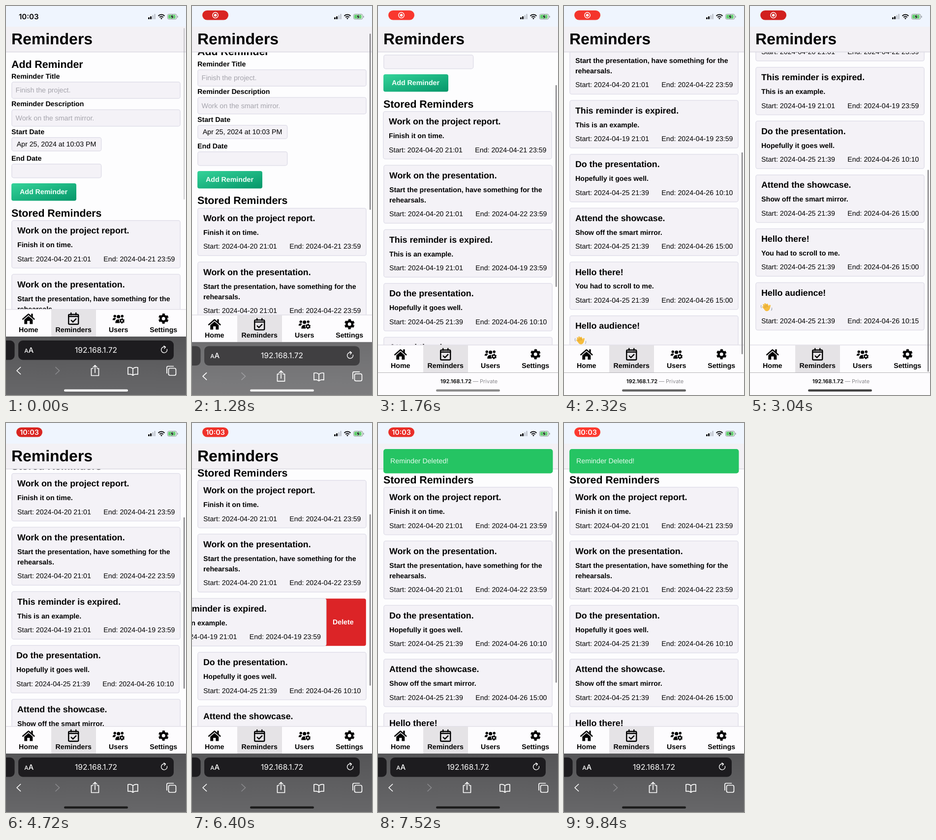
An HTML page that plays this animation: 366x792 px, repeating every 9.92 s.

```html
<!DOCTYPE html>
<html lang="en">
<head>
<meta charset="utf-8">
<title>Reminders</title>
<style>
  html, body { margin: 0; width: 100%; height: 100%; overflow: hidden; background: #fdfdfe; }
  svg { display: block; width: 366px; height: 792px; font: 14.2px "Liberation Sans", Arial, sans-serif; text-rendering: geometricPrecision; }
  .b { font-weight: 700; }
  .ui { font-family: Inter, sans-serif; }
  .box { fill: #f4f2f7; stroke: #e1e0ea; stroke-width: 1.5; }
  .line { fill: none; stroke: #fff; stroke-width: 1.7; stroke-linecap: round; stroke-linejoin: round; }
</style>
</head>
<body>
<svg id="stage" viewBox="0 0 366 792"></svg>
<script>
const LOOP = 9920, STEP = 80, CARD_H = 98.2, LINE_H = 21.3, GAP = 11.4, EXPIRED = 2;

const cards = [
  { title: 'Work on the project report.', lines: ['Finish it on time.'], start: '2024-04-20 21:01', end: '2024-04-21 23:59' },
  { title: 'Work on the presentation.', lines: ['Start the presentation, have something for the', 'rehearsals.'], start: '2024-04-20 21:01', end: '2024-04-22 23:59' },
  { title: 'This reminder is expired.', lines: ['This is an example.'], start: '2024-04-19 21:01', end: '2024-04-19 23:59' },
  { title: 'Do the presentation.', lines: ['Hopefully it goes well.'], start: '2024-04-25 21:39', end: '2024-04-26 10:10' },
  { title: 'Attend the showcase.', lines: ['Show off the smart mirror.'], start: '2024-04-25 21:39', end: '2024-04-26 15:00' },
  { title: 'Hello there!', lines: ['You had to scroll to me.'], start: '2024-04-25 21:39', end: '2024-04-26 15:00' },
  { title: 'Hello audience!', lines: [''], wave: true, start: '2024-04-25 21:39', end: '2024-04-26 10:15' },
];
cards.forEach(c => c.h = CARD_H + (c.lines.length - 1) * LINE_H);

// Markup helpers
const text = (x, y, s, attrs = '') => `<text x="${x}" y="${y}" ${attrs}>${s}</text>`;
const bold = (x, y, s, size = 14.2, attrs = '') => text(x, y, s, `class="b" font-size="${size}" ${attrs}`);
const rect = (x, y, w, h, attrs = '') => `<rect x="${x}" y="${y}" width="${w}" height="${h}" ${attrs}/>`;
const box = (x, y, w, h) => rect(x + .75, y + .75, w - 1.5, h - 1.5, 'rx="4" class="box"');
const path = (d, attrs = 'class="line"') => `<path d="${d}" ${attrs}/>`;
const dot = (x, y, r, attrs = '') => `<circle cx="${x}" cy="${y}" r="${r}" ${attrs}/>`;
const at = (x, y, s) => `<g transform="translate(${x} ${y})">${s}</g>`;
const gear = s => `<g transform="scale(${s})" fill="none" stroke="#000">` +
  dot(0, 0, 5.8, 'stroke-width="4.6"') + dot(0, 0, 8.7, 'stroke-width="3.4" stroke-dasharray="4.9 4.21" transform="rotate(14)"') + '</g>';

const hand = `<g transform="translate(33 51) rotate(-32)" stroke="#f6bd3f" stroke-linecap="round" stroke-width="3.1">
  <ellipse cx="0" cy="3" rx="5.6" ry="5.2" fill="#f6bd3f" stroke="none"/>
  ${path('M-4 2L-5-4M-1.4 0L-2-7M1.6 0V-7M4.2 2L4.6-4M4 5L8 1', '')}
  ${path('M-2.7 0V-4M.1 0V-5M2.9 1V-4', 'stroke="#b9822b" stroke-width=".6"')}
  ${path('M-9-4q0-3 2.5-5M9 7q-1 3-3.5 4', 'fill="none" stroke="#8d99a6" stroke-width="1"')}</g>`;

const deleteMarkup = c => `<g id="delete">${rect(11.5, 1, 342.3, c.h - 2, 'id="deleteBack" rx="4" fill="#dc2427"')}
  ${bold(367.5, 53, 'Delete', 14.2, 'id="deleteText" fill="#fff" clip-path="url(#inside)"')}</g>`;
const cardMarkup = (c, i) => `<g id="card${i}">${i === EXPIRED ? deleteMarkup(c) : ''}
  <g id="face${i}">${box(11, 0, 344, c.h)}${bold(23, 27.2, c.title, 17.75)}
  ${c.wave ? hand : c.lines.map((s, n) => bold(23, 55 + n * LINE_H, s)).join('')}
  ${text(23, c.h - 14.7, 'Start: ' + c.start)}${text(343.5, c.h - 14.7, 'End: ' + c.end, 'text-anchor="end"')}</g></g>`;

const form = bold(11, 125.5, 'Add Reminder', 21.3) +
  bold(11, 148, 'Reminder Title') + box(11, 154, 344, 35) + text(19.5, 176, 'Finish the project.', 'fill="#a5a4ac"') +
  bold(11, 204.3, 'Reminder Description') + box(11, 210.5, 344, 35) + text(19.5, 232.7, 'Work on the smart mirror.', 'fill="#a5a4ac"') +
  bold(11, 261, 'Start Date') + box(11, 267, 183.5, 29) + text(102.5, 286.3, 'Apr 25, 2024 at 10:03 PM', 'text-anchor="middle"') +
  bold(11, 315, 'End Date') + box(11, 321, 183.5, 29.5) +
  rect(11, 361, 132, 35.5, 'rx="4" fill="url(#green)"') + bold(28, 383.3, 'Add Reminder', 14.2, 'fill="#f2fff9"') +
  bold(11, 428.5, 'Stored Reminders', 21.3);

const house = path('M-11.5 1L0-9L11.5 1', 'fill="none" stroke="#000" stroke-width="2.6" stroke-linecap="round" stroke-linejoin="round"') +
  rect(5.5, -10, 3.3, 7) + path('M-8.5 2L0-5.3L8.5 2V11H2.6V4.5H-2.6V11H-8.5Z', '');
const calendar = `<g fill="none" stroke="#000" stroke-width="2.4" stroke-linecap="round" stroke-linejoin="round">
  ${rect(-10, -8.5, 20, 20, 'rx="2"')}${path('M-10-4.5H10M-5-11.5V-8M5-11.5V-8M-4.5 3.5L-1.2 6.8L5 .6', '')}</g>`;
const users = dot(-7.5, -5, 2.7) + dot(0, -4, 3.6) + dot(7.5, -5, 2.7) +
  path('M-12 3q0-4.5 4-4.5q2 0 3 1.2q-2 1.3-2.3 3.3ZM-6.5 9q0-7.5 6-7.5q2.5 0 3 1v6.5Z', '') +
  at(7, 4.5, dot(0, 0, 6, 'fill="#fdfcfe"') + gear(.52));

const tabs = rect(0, 618, 366, 55.5, 'fill="#fdfcfe"') + rect(92, 618, 91, 55.5, 'fill="#e5e3e6"') + rect(0, 617, 366, 1.5, 'fill="#e2e0e8"') +
  [['Home', house], ['Reminders', calendar], ['Users', users], ['Settings', gear(1)]].map(([name, icon], i) => {
    const x = 45.75 + i * 91.5;
    return at(x, 636.5, icon) + bold(x, 664, name, 14.2, 'text-anchor="middle"');
  }).join('');

const toolbar = rect(0, 673, 366, 120, 'fill="url(#chrome)"') +
  rect(-20, 681, 37.5, 39.5, 'rx="9" fill="#1d1c1f"') + rect(25, 681, 316, 39.5, 'rx="9" fill="#1d1c1f"') +
  `<g fill="#fff" class="ui">${text(37.3, 706, 'A', 'font-size="11.5" font-weight="500"')}${text(45.5, 706, 'A', 'font-size="15" font-weight="500"')}
  ${text(183, 706, '192.168.1.72', 'font-size="15.6" text-anchor="middle"')}</g>` +
  path('M327.5 699a6 6 0 1 1-4-4.6M321 692l3.5 2.4l-2.6 3.2', 'class="line" style="stroke-width:1.4"') +
  path('M29.5 735.5L22 742.5L29.5 749.5') + path('M101 735.5L108.5 742.5L101 749.5', 'class="line" style="stroke:#8b8b8e"') +
  path('M177 738h-3.5v14.5h15V738H185M181 746.5V732M177 735.5L181 731.5L185 735.5') +
  path('M258 738.5q-4-4-10-2.5v14q6-1.5 10 2q4-3.5 10-2v-14q-6-1.5-10 2.5v13') +
  rect(330.5, 737.5, 15, 14.5, 'rx="3" class="line"') + path('M327 747.5V736q0-2.5 2.5-2.5h11');

const statusIcons = [4, 6, 8.5, 11].map((h, i) => rect(289 + i * 4, 27 - h, 3, h, `rx="1" fill="${i < 2 ? '#0b0b0d' : '#c3c8d0'}"`)).join('') +
  `<g fill="none" stroke="#0b0b0d" stroke-width="2.1">${path('M309.6 20.2a9 9 0 0 1 12.8 0M312.3 23a5.2 5.2 0 0 1 7.4 0', '')}</g>` +
  path('M316 27.2l-2-2.2q2-1.6 4 0Z', 'fill="#0b0b0d"') +
  rect(328.5, 16.5, 18.5, 10.5, 'rx="3" fill="#dff0e2" stroke="#8d949b"') + rect(330, 18, 14.5, 7.5, 'rx="1.7" fill="#5fce6c"') +
  rect(348.2, 20, 1.4, 3.8, 'rx=".7" fill="#8d949b"') +
  path('M339.6 15.8l-5.2 6.6h3l-1.4 5.4l5.4-6.8h-3Z', 'fill="#0b0b0d" stroke="#eef6fa" stroke-width=".5"');

const gradient = (id, a, b, x2, y2) =>
  `<linearGradient id="${id}" x1="0" y1="0" x2="${x2}" y2="${y2}"><stop stop-color="${a}"/><stop offset="1" stop-color="${b}"/></linearGradient>`;

const stage = document.getElementById('stage');
stage.innerHTML = `<defs>${gradient('green', '#34d399', '#059669', 1, 1)}${gradient('chrome', '#555557', '#676769', 0, 1)}
  <clipPath id="inside"><rect id="insideBox" x="11" width="343" height="98"/></clipPath></defs>
  ${rect(0, 0, 366, 792, 'fill="#fdfdfe"')}
  <g id="form">${form}</g>${cards.map(cardMarkup).join('')}
  ${rect(0, 0, 366, 42, 'fill="#eff5fe"')}${rect(0, 42, 366, 51.2, 'fill="#f3f1f5"')}${rect(0, 92.7, 366, 1.7, 'fill="#dddbe3"')}
  ${bold(11, 78.4, 'Reminders', 31.95)}
  <g id="tabs">${tabs}</g>
  ${rect(361, 45, 2.5, 349, 'id="scrollbar" rx="1.25" fill="#858488"')}
  <g id="chrome">${rect(0, 673, 366, 120, 'fill="#fdfcfe"')}${rect(0, 673, 366, 1, 'fill="#b4b3b7"')}<g id="toolbar">${toolbar}</g></g>
  <g id="label" class="ui" font-size="11">${text(190, 767.5, '192.168.1.72', 'font-weight="600" text-anchor="end"')}${text(193, 767.5, '— Private', 'fill="#8b8a8f"')}</g>
  ${rect(118, 780.5, 130, 4.5, 'id="homeBar" rx="2.25"')}
  <g id="toast">${rect(11, 53, 344.5, 49.5, 'rx="5" fill="#25c463"')}${text(25, 82.3, 'Reminder Deleted!', 'fill="#e6f9ed"')}</g>
  ${text(26, 27, '10:03', 'id="clock" class="ui" font-size="15" font-weight="600"')}
  <g id="pill">${rect(21, 9, 53, 19.5, 'id="pillBack" rx="9.75"')}
    <g id="record">${dot(47.5, 18.7, 5.7, 'fill="none" stroke="#fff" stroke-width="1.5"')}${dot(47.5, 18.7, 2.8, 'fill="#fff"')}</g>
    ${text(47.5, 23.8, '10:03', 'id="pillClock" class="ui" font-size="14.3" font-weight="600" fill="#fff" text-anchor="middle"')}</g>
  ${statusIcons}`;

const el = Object.fromEntries([...stage.querySelectorAll('[id]')].map(e => [e.id, e]));
const move = (id, x, y) => el[id].setAttribute('transform', `translate(${x} ${y})`);
const fade = (id, v) => el[id].setAttribute('opacity', v);
const mix = (a, b, k) => a + (b - a) * k;
const ramp = (t, a, b) => { const k = Math.min(1, Math.max(0, (t - a) / (b - a))); return k * k * (3 - 2 * k); };

// Smooth curve through [time, value] points without overshoot
function curve(points) {
  const slope = i => (points[i + 1][1] - points[i][1]) / (points[i + 1][0] - points[i][0]);
  const tangent = i => {
    if (i === 0 || i === points.length - 1) return 0;
    const a = slope(i - 1), b = slope(i);
    return a * b <= 0 ? 0 : 2 * a * b / (a + b);
  };
  return t => {
    if (t <= points[0][0]) return points[0][1];
    const i = points.findIndex((p, n) => n < points.length - 1 && t < points[n + 1][0]);
    if (i < 0) return points[points.length - 1][1];
    const [t0, v0] = points[i], [t1, v1] = points[i + 1], d = t1 - t0, k = (t - t0) / d, q = 1 - k;
    return v0 * (1 + 2 * k) * q * q + tangent(i) * d * k * q * q + v1 * k * k * (3 - 2 * k) - tangent(i + 1) * d * k * k * q;
  };
}

// Drag and coast down, drag back up, then drift along with the swipe
const scrollAt = curve([[1120, 0], [1440, 75], [1760, 222], [2000, 365], [2300, 480], [2600, 535], [2880, 552.5],
  [3680, 552.5], [4000, 495], [4320, 400], [4720, 334], [5600, 334], [6400, 320], [6960, 306]]);
const homeBarAt = curve([[1120, 255], [1760, 140], [3040, 68], [4240, 28]]);
// Sideways shift of the card under the finger
const swipes = {
  0: curve([[1200, 0], [1600, -1], [1840, -1], [2000, 0]]),
  [EXPIRED]: curve([[5680, 0], [6080, -40], [6400, -81.5], [6640, -170], [6960, -360]]),
  3: curve([[3760, 0], [4320, -2], [4800, -2], [5040, 0]]),
};

function render(t) {
  const scroll = scrollAt(t), collapse = ramp(t, 1160, 1640) - ramp(t, 3920, 4440), shrink = ramp(t, 6960, 7280);

  move('form', 0, -scroll);
  let y = 436;
  cards.forEach((card, i) => {
    move('card' + i, 0, y - scroll);
    move('face' + i, swipes[i] ? swipes[i](t) : 0, 0);
    y += (card.h + GAP) * (i === EXPIRED ? 1 - shrink : 1);
  });
  const swipe = swipes[EXPIRED](t);
  el.delete.style.display = swipe < -.5 && shrink < 1 ? '' : 'none';
  el.deleteBack.setAttribute('height', (CARD_H - 2) * (1 - shrink));
  el.insideBox.setAttribute('x', 11 - swipe);
  move('deleteText', swipe, 0);
  fade('deleteText', 1 - shrink);

  el.scrollbar.setAttribute('y', 45 + scroll * mix(.44, .522, collapse));
  el.scrollbar.setAttribute('height', mix(349, 411, collapse));
  fade('scrollbar', t < 1040 ? .35 * (1 - ramp(t, 0, 320)) : ramp(t, 1040, 1200) - ramp(t, 8320, 8640));

  move('tabs', 0, 72.5 * collapse);
  move('chrome', 0, 73 * collapse);
  fade('toolbar', 1 - collapse);
  fade('label', ramp(collapse, .6, 1));
  const grey = homeBarAt(t);
  el.homeBar.setAttribute('fill', `rgb(${grey},${grey},${grey})`);

  const glow = .5 + .5 * Math.cos(t * Math.PI / 1000), pill = ramp(t, 240, 560), time = ramp(t, 3840, 4080);
  el.pillBack.setAttribute('fill', `rgb(${mix(209, 255, glow)},${mix(32, 59, glow)},${mix(30, 48, glow)})`);
  fade('pill', pill);
  fade('clock', 1 - pill);
  fade('record', 1 - time);
  fade('pillClock', time);
  fade('toast', ramp(t, 7120, 7360));
}

function tick() {
  render(Math.floor(performance.now() % LOOP / STEP) * STEP);
  requestAnimationFrame(tick);
}
tick();
</script>
</body>
</html>
```
